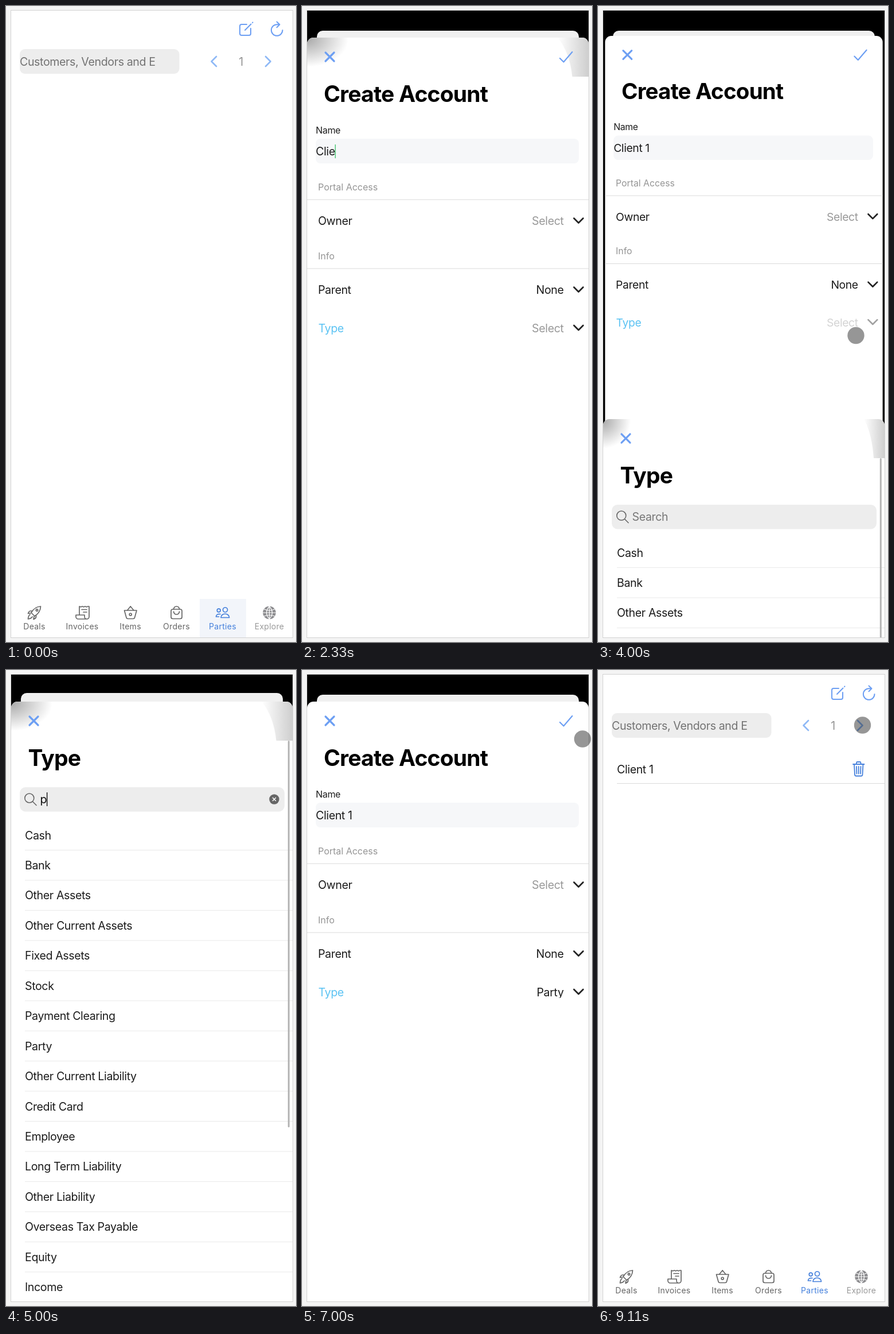
These frames come from a looping animation (506x1107 px, 9.56 s). An HTML page:

```html
<!DOCTYPE html>
<html lang="en">
<head>
<meta charset="utf-8">
<title>Create Account</title>
<style>
  html, body { margin: 0; width: 100%; height: 100%; overflow: hidden; background: #f4f4f4; }
  svg { display: block; width: 100vw; height: 100vh; }
  text { font: 19.6px Inter, "Open Sans", sans-serif; letter-spacing: -.02em; fill: #1c1c1c; white-space: pre; }
  text.title { font-size: 39px; font-weight: 700; fill: #000; }
  text.name { font-size: 16px; }
  text.head { font-size: 16px; letter-spacing: 0; fill: #959595; }
  .tab { stroke: #666; stroke-width: 1.7; }
  .tab text { font-size: 14px; letter-spacing: .02em; fill: #666; stroke: none; text-anchor: middle; }
  .tab.on { stroke: #4580dc; }
  .tab.on text { fill: #4580dc; }
  .tab.off text { fill: #999; }
  .end { text-anchor: end; }
  .icon { fill: none; stroke-linecap: round; stroke-linejoin: round; }
  .blue { stroke: #6d9ff3; }
  .rule { stroke: #dadada; }
</style>
</head>
<body>
<svg viewBox="0 0 506 1107" preserveAspectRatio="none">
  <defs>
    <clipPath id="app"><rect x="9" y="8" width="491" height="1091"/></clipPath>
    <clipPath id="round"><rect x="9" y="55" width="491" height="1060" rx="11"/></clipPath>
    <radialGradient id="leftFade" gradientUnits="userSpaceOnUse" cx="9" cy="58" r="48">
      <stop offset="0" stop-color="#aaa"/><stop offset="1" stop-color="#fff"/>
    </radialGradient>
    <linearGradient id="rightFade">
      <stop offset="0" stop-color="#fff"/><stop offset="1" stop-color="#cecece"/>
    </linearGradient>
    <rect id="sheet" x="9" y="55" width="491" height="1060" rx="11" fill="#fff"/>
    <rect id="left" x="9" y="55" width="52" height="56" fill="url(#leftFade)"/>
    <path id="right" d="M464 55H500V123H481Q478 80 464 55Z" fill="url(#rightFade)"/>
    <path id="cross" class="icon blue" stroke-width="3.2" d="M41 81l15 15m0-15l-15 15"/>
    <path id="down" class="icon" stroke="#222" stroke-width="2.7" d="M474.5 369.5l8 8 8-8"/>
  </defs>

  <rect x="8.5" y="7.5" width="492" height="1092" fill="#000" stroke="#d2d2d2"/>

  <g clip-path="url(#app)">
    <g id="page">
      <rect id="card" x="9" y="8" width="491" height="1091" fill="#fff"/>
      <g class="icon blue" stroke-width="2">
        <path id="edit" d="M420 32H411q-3 0-3 3V48q0 3 3 3H424q3 0 3-3V39M417 42L427.500 31.500M430 29l.5-.5"/>
        <path d="M482.500 42a9.800 9.800 0 1 1-9.800-9.800h4M472.500 27.500l5 4.700-5 5"/>
      </g>
      <rect x="24" y="75" width="278.500" height="43" rx="9" fill="#ededed"/>
      <text x="24" y="104" style="fill:#737373">Customers, Vendors and E</text>
      <path class="icon" stroke="#8fb9f6" stroke-width="2.7" d="M367 88l-8.500 8.500 8.500 8.500M453 88l8.500 8.500-8.500 8.500"/>
      <text x="410" y="104" text-anchor="middle" style="fill:#929292">1</text>

      <g id="client">
        <text x="33" y="179.500">Client 1</text>
        <path class="icon" stroke="#4580dc" stroke-width="1.8" d="M445 164H464.500M447 164l1 18q.1 2.500 2.500 2.500h8.500q2.400 0 2.500-2.500l1-18M451 164v-2.500q0-1.500 1.500-1.500h4.500q1.500 0 1.500 1.500v2.500M454.700 168v12.500M451 168l.4 12.500M458.500 168l-.4 12.500"/>
        <path class="rule" d="M33 197.500H500"/>
      </g>

      <rect id="hover" x="338" y="1032" width="81" height="67" fill="#f2f5fa"/>
      <g class="icon tab">
        <path d="M44 1056Q50 1045.500 60.500 1045Q60 1056 50 1062ZM46 1053h-3q-3 0-4.500 4.500l5-1M52.500 1060.500v3q-.5 2.500-4.500 4l1-5M42 1059q-3 2-3.500 8q6-1 7.500-4"/>
        <circle cx="54" cy="1051.500" r="1.700"/>
        <text x="49.500" y="1085">Deals</text>
      </g>
      <g class="icon tab">
        <path d="M128 1060V1045l2.500 1 2.500-1 2.500 1 2.500-1 2.500 1 2.500-1 2 0V1063a4 4 0 0 1-4 4H126a4 4 0 0 1-4-4V1060H137v3a4 4 0 0 0 4 4M132 1050.500h9M135 1055h6"/>
        <text x="133" y="1085">Invoices</text>
      </g>
      <g class="icon tab">
        <path d="M206.500 1052H228l-3.500 12.500q-.5 2-2.500 2H212.500q-2 0-2.500-2ZM211.500 1052l5.700-7 5.800 7"/>
        <circle cx="217.200" cy="1059" r="2"/>
        <text x="217" y="1085">Items</text>
      </g>
      <g class="icon tab">
        <rect x="288" y="1050" width="19" height="16.500" rx="3"/>
        <path d="M292.500 1050a5 5 0 0 1 10 0M292.500 1054a5 5 0 0 0 10 0"/>
        <text x="297.500" y="1085">Orders</text>
      </g>
      <g class="icon tab on">
        <circle cx="382.500" cy="1051" r="4"/>
        <circle cx="371.200" cy="1052" r="2.900"/>
        <path d="M375 1064.500c0-4 3.500-6.500 7.300-6.500s7.300 2.500 7.300 6.500ZM374 1058.500q-7-1-7.500 4.500h5"/>
        <text x="378" y="1085">Parties</text>
      </g>
      <g class="icon tab off">
        <circle cx="459.500" cy="1056" r="11.300" fill="#8c8c8f" stroke="none"/>
        <path stroke="#fff" stroke-width="1.200" d="M459.500 1045v22M448 1056h23M450.500 1050q9 4 18 0M450.500 1062q9-4 18 0M459.500 1045q-10 11 0 22q10-11 0-22"/>
        <text x="459.500" y="1085">Explore</text>
      </g>
      <rect id="dim" x="9" y="8" width="491" height="1091"/>
    </g>

    <g id="form">
      <use href="#sheet"/>
      <g id="formShade" clip-path="url(#round)"><use href="#left"/><use href="#right"/></g>
      <use href="#cross"/>
      <path class="icon blue" stroke-width="2.200" d="M450 91l6.500 6.500L471.500 80"/>
      <text class="title" x="38" y="167">Create Account</text>
      <text class="name" x="24" y="221.500">Name</text>
      <g id="fields">
        <rect x="24" y="231" width="459" height="43" rx="8" fill="#f6f7f9"/>
        <text id="name" x="24" y="260"></text>
        <path id="nameCaret" stroke="#50c878" stroke-width="1.500" d="M0 241V265"/>
        <text class="head" x="28" y="320.500">Portal Access</text>
        <path class="rule" d="M9 337H500M9 457H500"/>
        <text x="28" y="381">Owner</text>
        <text class="end" x="456.500" y="381" style="fill:#999">Select</text>
        <use href="#down"/>
        <text class="head" x="28" y="440.500">Info</text>
        <text x="28" y="501">Parent</text>
        <text class="end" x="456.500" y="501">None</text>
        <use href="#down" y="120"/>
        <text x="28.500" y="568" style="fill:#5cc3f3">Type</text>
        <g id="picker">
          <text id="kind" class="end" x="456.500" y="568"></text>
          <rect x="400" y="570.500" width="62" height="6" fill="#fff"/>
          <use href="#down" y="186.500"/>
        </g>
      </g>
      <rect id="formDim" x="9" y="55" width="491" height="1060" rx="11"/>
    </g>

    <g id="type">
      <use href="#sheet"/>
      <g id="typeShade" clip-path="url(#round)"><use href="#left"/><use href="#right"/></g>
      <use href="#cross"/>
      <text class="title" x="38.500" y="167">Type</text>
      <rect x="24" y="204" width="462" height="42.500" rx="10" fill="#ededed"/>
      <path class="icon" stroke="#666" stroke-width="1.600" d="M53 235.500l-6.500-6.500M48.800 223a8 8 0 1 1-16 0a8 8 0 0 1 16 0"/>
      <text id="query" x="59.500" y="232"></text>
      <path id="queryCaret" stroke="#111" stroke-width="1.400" d="M0 213V237"/>
      <g id="clear">
        <circle cx="468" cy="225" r="8.700" fill="#666"/>
        <path stroke="#fff" stroke-width="1.500" d="M465 222l6 6m0-6l-6 6"/>
      </g>
      <g id="rows"></g>
      <rect id="scroll" x="491.800" y="123" width="3" height="673" rx="1.500" fill="#b4b4b4"/>
    </g>

    <g id="bar">
      <rect x="9" y="8" width="491" height="3.500" fill="#b9b9b9"/>
      <rect x="9" y="8" width="145" height="3.500" fill="#3f7df0"/>
    </g>
  </g>
  <circle id="touch" r="14.700" fill-opacity=".41"/>
</svg>

<script>
const $ = id => document.getElementById(id);
const LOOP = 9560, LAST = 9110, MID = 254.5, ROW = 52.45;
const kinds = ["Cash", "Bank", "Other Assets", "Other Current Assets", "Fixed Assets", "Stock",
  "Payment Clearing", "Party", "Other Current Liability", "Credit Card", "Employee",
  "Long Term Liability", "Other Liability", "Overseas Tax Payable", "Equity", "Income"];

// [from, to, x, y]
const taps = [
  [300, 600, 430, 16], [600, 900, 418, 40], [900, 1300, 415.5, 48.5],
  [3600, 4300, 450, 573.5], [5900, 6300, 19, 288],
  [6900, 7300, 489.5, 120], [7300, 7600, 461, 89], [9100, LOOP, 461.5, 96]
];

$("rows").innerHTML = kinds.map(k =>
  `<g><text x="33" y="294.5">${k}</text><path stroke="#e9e9e9" d="M33 313.500H500"/></g>`).join("");
const rows = [...$("rows").children];

const show = (id, on) => $(id).style.display = on ? "" : "none";
const set = (id, key, value) => $(id).setAttribute(key, value);
const easeOut = u => 1 - (1 - Math.min(1, Math.max(0, u))) ** 3;
const slide = (t, start, end) => easeOut((t - start) / 400) - easeOut((t - end) / 400);

// Push a sheet back: shrink about its top centre and move that edge by dy.
const recede = (k, top, dy) =>
  `translate(${MID} ${top + dy * k}) scale(${1 - .069 * k}) translate(${-MID} ${-top})`;
const rise = p => `translate(0 ${(1 - p) * 1044})`;

// Corner shadows spread sideways as the sheet settles.
function spread(id, p) {
  const s = 1 + Math.max(0, p - .5);
  [9, 500].forEach((x, i) =>
    $(id).children[i].setAttribute("transform", `translate(${x * (1 - s)} 0) scale(${s} 1)`));
}

function type(id, text, caretOn) {
  $(id).textContent = text;
  show(id + "Caret", caretOn);
  const x = +$(id).getAttribute("x") + (text ? $(id).getComputedTextLength() : 0);
  set(id + "Caret", "transform", `translate(${x + .5} 0)`);
}

function draw(t) {
  const form = slide(t, 916, 7900), list = slide(t, 3944, 6240);
  const back = form ** 2, formBack = list ** 1.6;

  set("page", "transform", recede(back, 8, 35));
  set("card", "rx", 11 * back);
  set("dim", "opacity", .06 * back ** 3);
  set("edit", "opacity", t > 600 && t < 1300 ? .45 : 1);
  show("hover", t < 600);
  show("client", t > 8300);
  show("bar", t > 900 && t < 1300);

  show("form", form > 0);
  set("form", "transform", rise(form) + recede(formBack, 55, -15));
  set("formDim", "opacity", .06 * formBack ** 3);
  show("formShade", t < 3300);
  spread("formShade", form);
  show("fields", t > 1300);
  const typed = Math.max(0, Math.floor((t - 1670) / 165));
  type("name", "Client 1".slice(0, typed), t > 1600 && t < 3300);
  const chosen = t > 6300;
  $("kind").textContent = chosen ? "Party" : "Select";
  $("kind").style.fill = chosen ? "#1c1c1c" : "#999";
  set("picker", "opacity", t > 3600 && t < 4300 ? .42 : 1);

  show("type", list > 0);
  set("type", "transform", rise(list));
  spread("typeShade", list);
  const query = "party".slice(0, t < 4900 ? 0 : t < 5300 ? 1 : t < 5600 ? 3 : 5);
  type("query", query, t > 4600 && t < 6300);
  if (!query) $("query").textContent = t > 4600 ? "" : "Search";
  $("query").style.fill = query ? "#111" : "#777";
  show("clear", query);
  let n = 0;
  rows.forEach((row, i) => {
    const hit = query.length < 2 || kinds[i].toLowerCase().includes(query);
    row.style.display = hit ? "" : "none";
    if (hit) row.setAttribute("transform", `translate(0 ${ROW * n++})`);
  });
  show("scroll", n > 10);

  const tap = taps.find(([from, to]) => t >= from && t < to);
  show("touch", tap);
  if (tap) set("touch", "transform", `translate(${tap[2]} ${tap[3]})`);
}

// The picture advances three times a second, with a longer hold at the end.
function tick() {
  const t = performance.now() % LOOP;
  draw(t >= LAST ? LAST : Math.min(26, Math.floor((t + 4) * 3 / 1000)) * 1000 / 3);
  requestAnimationFrame(tick);
}
tick();
</script>
</body>
</html>
```
